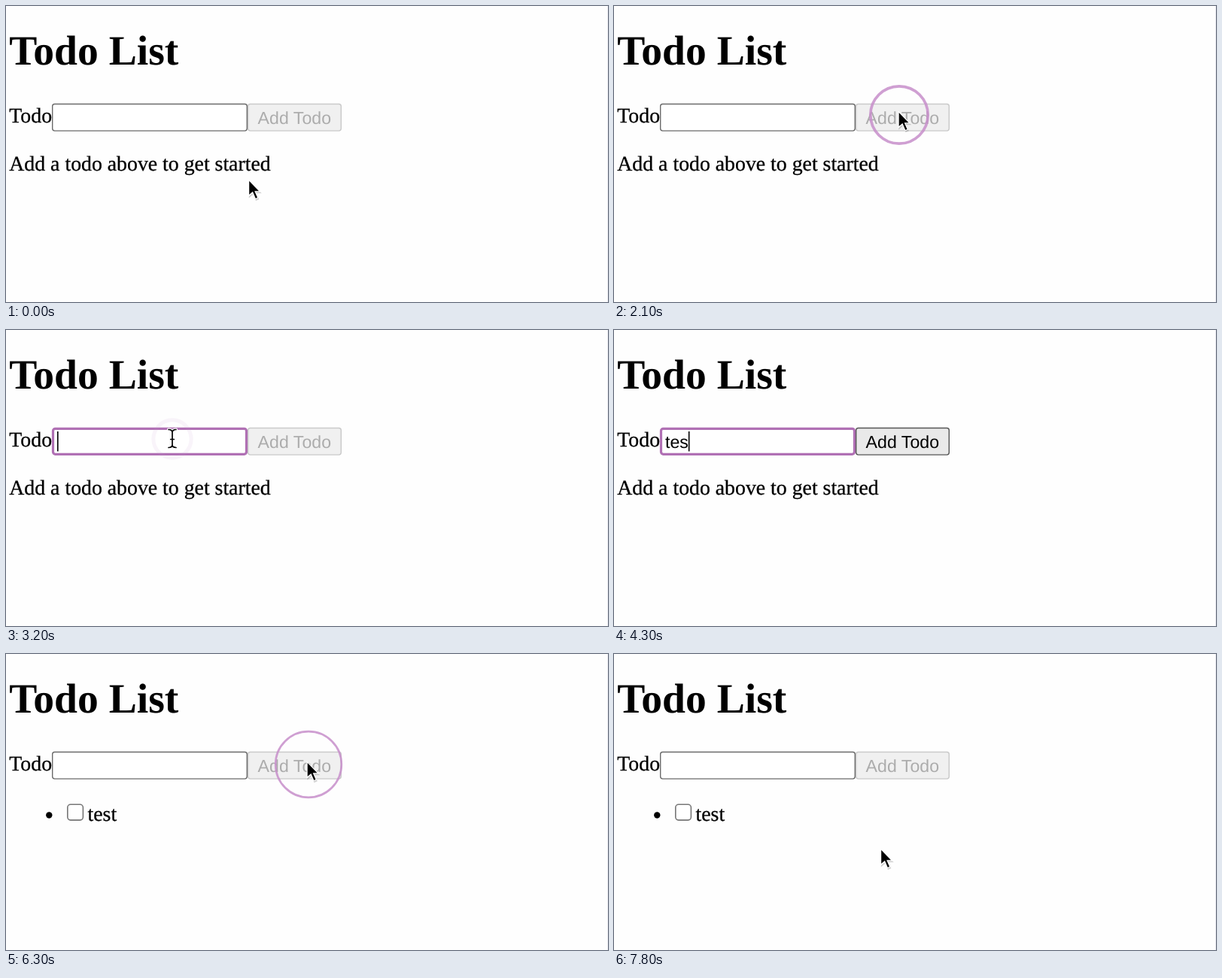
An HTML page for the animation above (7.9 s loop, 800x394 px).

```html
<!DOCTYPE html>
<html lang="en">
<head>
<meta charset="utf-8">
<title>Todo List</title>
<style>
html, body { margin: 0; width: 100%; height: 100%; overflow: hidden; background: #fefefe; }
svg { display: block; width: 100vw; height: 100vh; }
text { font-family: "Liberation Serif", "Times New Roman", serif; font-size: 27.8px; text-rendering: geometricPrecision; }
.body { stroke: #000; stroke-width: .3px; }
.ui { font-family: "Liberation Sans", Arial, sans-serif; font-size: 23.17px; }
</style>
</head>
<body>
<svg viewBox="0 0 800 394">
  <rect width="800" height="394" fill="#fefefe"/>
  <rect x="799" width="1" height="394" fill="#e9e9f0"/>
  <text x="4.3" y="78" style="font-size:55.6px;font-weight:bold">Todo List</text>
  <text class="body" x="4.3" y="155.2">Todo</text>
  <rect id="field" fill="#fff"/>
  <text id="typed" class="ui" x="68" y="157"></text>
  <rect id="caret" y="135" width="1.6" height="26.5"/>
  <rect id="button" x="321.7" y="130.5" width="123.6" height="35.6" rx="3" stroke-width="1.4"/>
  <text id="label" class="ui" x="334.6" y="156.8">Add Todo</text>
  <text id="hint" class="body" x="4.3" y="219">Add a todo above to get started</text>
  <g id="item">
    <circle cx="57.3" cy="214.5" r="4.2"/>
    <rect x="81.8" y="200.3" width="20.6" height="20.8" rx="4" fill="#fff" stroke="#767676" stroke-width="1.6"/>
    <text class="body" x="108.5" y="222">test</text>
  </g>
  <g id="rings" fill="none" stroke="#c78fcb"></g>
  <g id="arrow">
    <path d="M0 0V23.5L5.4 18.8L9.2 27L13.6 25L10 17H17Z" transform="translate(.8 1.8)" opacity=".18"/>
    <path d="M0 0V23.5L5.4 18.8L9.2 27L13.6 25L10 17H17Z" fill="#fff"/>
    <path d="M1.2 2.6V20.6L5.9 16.6L9.8 25.4L12 24.4L8.2 15.7H14Z"/>
  </g>
  <g id="beam" fill="none" stroke-linecap="round">
    <path id="beamHalo" stroke="#fff" stroke-width="4.2"/>
    <path id="beamLine" stroke="#000" stroke-width="1.7"/>
  </g>
</svg>
<script>
const LOOP = 7900, STEP = 100, RING_MS = 600;
const FOCUS = 3100, ADDED = 6050;
const KEYS = [3900, 4100, 4300, 4400];
const HIDDEN = [3900, 5100];

// time, x, y of the pointer's hot spot
const PATH = [
  [0, 322, 230.5], [100, 322, 230.5], [850, 384, 131], [1000, 384, 131],
  [1350, 378.5, 138.5], [2100, 377.5, 139.5], [2450, 377.5, 139.5], [3000, 221, 144.5],
  [5100, 221, 144.5], [5700, 401, 134.5], [5900, 399.5, 142.5],
  [7400, 399.5, 142.5], [7800, 354, 258.5]
];
// start, x, y of each click
const CLICKS = [
  [950, 387, 135], [1850, 379, 145], [3180, 221, 145],
  [5950, 402, 147], [6444, 402, 147], [6744, 402, 147]
];

const el = id => document.getElementById(id);
const set = (node, attrs) => { for (const k in attrs) node.setAttribute(k, attrs[k]); };
const show = (id, on) => set(el(id), { visibility: on ? "visible" : "hidden" });
const ease = p => p * p * (3 - 2 * p);

const rings = CLICKS.map(([, cx, cy]) => {
  const c = document.createElementNS("http://www.w3.org/2000/svg", "circle");
  set(c, { cx, cy });
  return el("rings").appendChild(c);
});
const BEAM = "M-5 -12Q0 -12 0 -8V8Q0 12 -5 12M5 -12Q0 -12 0 -8M5 12Q0 12 0 8M-2.3 1H2.3";
set(el("beamHalo"), { d: BEAM });
set(el("beamLine"), { d: BEAM });

function pointerAt(t) {
  const i = PATH.findIndex(p => p[0] > t);
  if (i < 0) return PATH[PATH.length - 1].slice(1);
  const a = PATH[i - 1], b = PATH[i];
  const p = ease((t - a[0]) / (b[0] - a[0]));
  return [a[1] + (b[1] - a[1]) * p, a[2] + (b[2] - a[2]) * p];
}

function drawForm(t) {
  const focus = t >= FOCUS && t < ADDED;
  const added = t >= ADDED;
  const count = added ? 0 : KEYS.filter(k => t >= k).length;
  const inset = focus ? 1.5 : 0.7;
  set(el("field"), {
    x: 61 + inset, y: 129.8 + inset, width: 260 - 2 * inset, height: 37 - 2 * inset,
    rx: 3, stroke: focus ? "#b070b4" : "#6a6a6a", "stroke-width": focus ? 3.2 : 1.4
  });
  el("typed").textContent = "test".slice(0, count);
  set(el("caret"), { x: 68 + (count ? el("typed").getComputedTextLength() : 0) });
  show("caret", focus);
  set(el("button"), count
    ? { fill: "#e9e9e9", stroke: "#555" }
    : { fill: "#f0f0f0", stroke: "#c9c9c9" });
  set(el("label"), { fill: count ? "#000" : "#acacac" });
  show("hint", !added);
  show("item", added);
}

function drawRings(t) {
  rings.forEach((ring, i) => {
    const p = (t - CLICKS[i][0]) / RING_MS;
    const on = p >= 0 && p < 1;
    set(ring, {
      r: on ? 24 + 34 * p : 0,
      "stroke-width": on ? Math.min(5, 6.4 * (1 - p)) : 0,
      opacity: on ? Math.min(0.85, 3 * p) : 0
    });
  });
}

function drawPointer(t) {
  const [x, y] = pointerAt(t);
  const seen = t < HIDDEN[0] || t >= HIDDEN[1];
  const text = x > 61 && x < 321 && y > 130 && y < 167;
  set(el("arrow"), { transform: `translate(${x} ${y})` });
  set(el("beam"), { transform: `translate(${x} ${y})` });
  show("arrow", seen && !text);
  show("beam", seen && text);
}

function render(now) {
  const t = Math.floor((now % LOOP) / STEP) * STEP;
  drawForm(t);
  drawRings(t);
  drawPointer(t);
}

const start = performance.now();
function tick() {
  render(performance.now() - start);
  requestAnimationFrame(tick);
}
tick();
</script>
</body>
</html>
```
